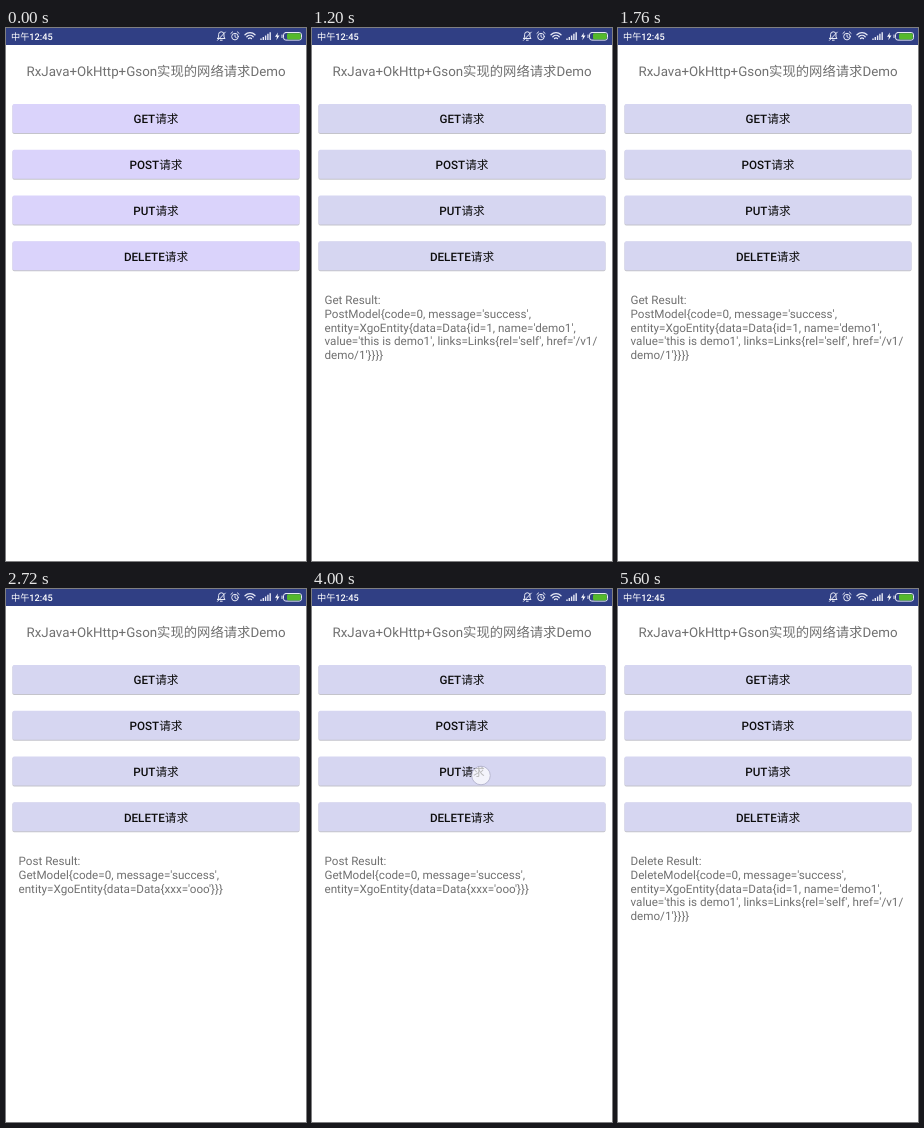
Write an HTML page that moves like this. It is 300 px wide and 533 px high and loops after 5680 ms.

```html
<!DOCTYPE html>
<html lang="zh-CN">
<head>
<meta charset="utf-8">
<title>网络请求Demo</title>
<style>
  html, body { margin: 0; width: 100%; height: 100%; overflow: hidden; background: #fff; }
  svg { display: block; width: 100%; height: 100%; }
  text {
    font-family: Roboto, "Noto Sans CJK SC", "Noto Sans CJK", sans-serif;
    text-rendering: geometricPrecision;
    white-space: pre;
  }
  .title { font-size: 13.33px; fill: #707070; text-anchor: middle; }
  .label { font-size: 11.67px; font-weight: 500; fill: #0c0c0c; text-anchor: middle; }
  .result { font-size: 11.67px; fill: #707070; }
  .clock { font-size: 9.2px; font-weight: 500; fill: #fff; }
  .icon { fill: none; stroke: #e8eaf6; stroke-width: 1; stroke-linecap: round; stroke-linejoin: round; }
</style>
</head>
<body>
<svg viewBox="0 0 300 533" preserveAspectRatio="none">
  <rect width="300" height="533" fill="#fff"/>
  <rect width="300" height="17" fill="#303f84"/>
  <text class="clock" x="5" y="12">中午12:45</text>
  <g class="icon">
    <path d="M211.5 10.5h7.5l-1-1.5v-2.5a2.7 2.7 0 0 0-5.4 0V9zM214.4 12.2h1.8M211.5 12.3l7.8-8.2"/>
    <circle cx="229" cy="8.6" r="3.3"/>
    <path d="M229 6.8v2l1.3.8M224.9 5.4l1.7-1.5M233.1 5.4l-1.7-1.5"/>
    <path d="M239 6.7a7 7 0 0 1 10 0M240.8 8.7a4.6 4.6 0 0 1 6.4 0M242.5 10.6a2.2 2.2 0 0 1 3 0" stroke-width="1.3"/>
    <path d="M255 12v-1.5M257.3 12v-3M259.6 12v-4.6M261.9 12v-6.2M264.2 12v-7.8" stroke-width="1.4" stroke-linecap="butt"/>
    <path d="M272 4.5l-3 4.3h2l-.7 3.4 3.2-4.6h-2.1z" fill="#fff" stroke="none"/>
    <rect x="277.5" y="4.5" width="18" height="7.6" rx="2.4"/>
    <path d="M276 7v2.6"/>
    <rect x="281" y="5.2" width="13.8" height="6.2" rx="1.4" fill="#55b92c" stroke="none"/>
  </g>
  <text class="title" x="150" y="47.5">RxJava+OkHttp+Gson实现的网络请求Demo</text>
  <g id="buttons"></g>
  <g id="result"></g>
  <circle id="touch" r="9.3" fill="#fff" fill-opacity=".7" stroke="#b9b9d2" stroke-width="1"/>
</svg>
<script>
const LOOP = 5680;
const TOUCH_TIME = 240;
const REPLY_DELAY = 320;
const LINE = 13.67;
const byId = id => document.getElementById(id);

function add(parent, tag, attrs, text = '') {
  const node = document.createElementNS('http://www.w3.org/2000/svg', tag);
  for (const key in attrs) node.setAttribute(key, attrs[key]);
  node.textContent = text;
  parent.append(node);
  return node;
}

const fullReply = [
  "entity=XgoEntity{data=Data{id=1, name='demo1',",
  "value='this is demo1', links=Links{rel='self', href='/v1/",
  "demo/1'}}}}"
];
const shortReply = ["entity=XgoEntity{data=Data{xxx='ooo'}}}"];

const requests = [
  { name: 'Get', model: 'Post', at: 720, x: 194, y: 89, reply: fullReply },
  { name: 'Post', model: 'Get', at: 2400, x: 205, y: 138, reply: shortReply },
  { name: 'Put', model: 'Put', at: 3840, x: 169, y: 186.5, reply: shortReply },
  { name: 'Delete', model: 'Delete', at: 4800, x: 176, y: 231, reply: fullReply }
];

requests.forEach((request, i) => {
  const y = 76 + i * 45.75;
  const buttons = byId('buttons');
  add(buttons, 'rect', { x: 6.5, y: y + 0.6, width: 287, height: 29.3, rx: 1.7, fill: '#c4c4cb' });
  request.face = add(buttons, 'rect', { x: 6.5, y, width: 287, height: 29, rx: 1.7 });
  add(buttons, 'text', { class: 'label', x: 150, y: y + 19.4 }, request.name.toUpperCase() + '请求');

  request.output = add(byId('result'), 'g', {});
  const lines = [
    `${request.name} Result:`,
    `${request.model}Model{code=0, message='success',`,
    ...request.reply
  ];
  lines.forEach((line, n) =>
    add(request.output, 'text', { class: 'result', x: 12.5, y: 276.4 + n * LINE }, line));
});

const show = (node, visible) => node.setAttribute('visibility', visible ? 'visible' : 'hidden');

function render(t) {
  const pressed = requests.find(r => t >= r.at && t < r.at + TOUCH_TIME);
  const answered = requests.filter(r => t >= r.at + REPLY_DELAY).pop();
  for (const r of requests) {
    show(r.output, r === answered);
    r.face.setAttribute('fill', answered ? '#d6d6f1' : '#dad3fb');
  }
  const touch = byId('touch');
  show(touch, pressed);
  if (pressed) {
    touch.setAttribute('cx', pressed.x);
    touch.setAttribute('cy', pressed.y);
  }
}

const start = performance.now();
function tick() {
  render((performance.now() - start) % LOOP);
  requestAnimationFrame(tick);
}
tick();
</script>
</body>
</html>
```
